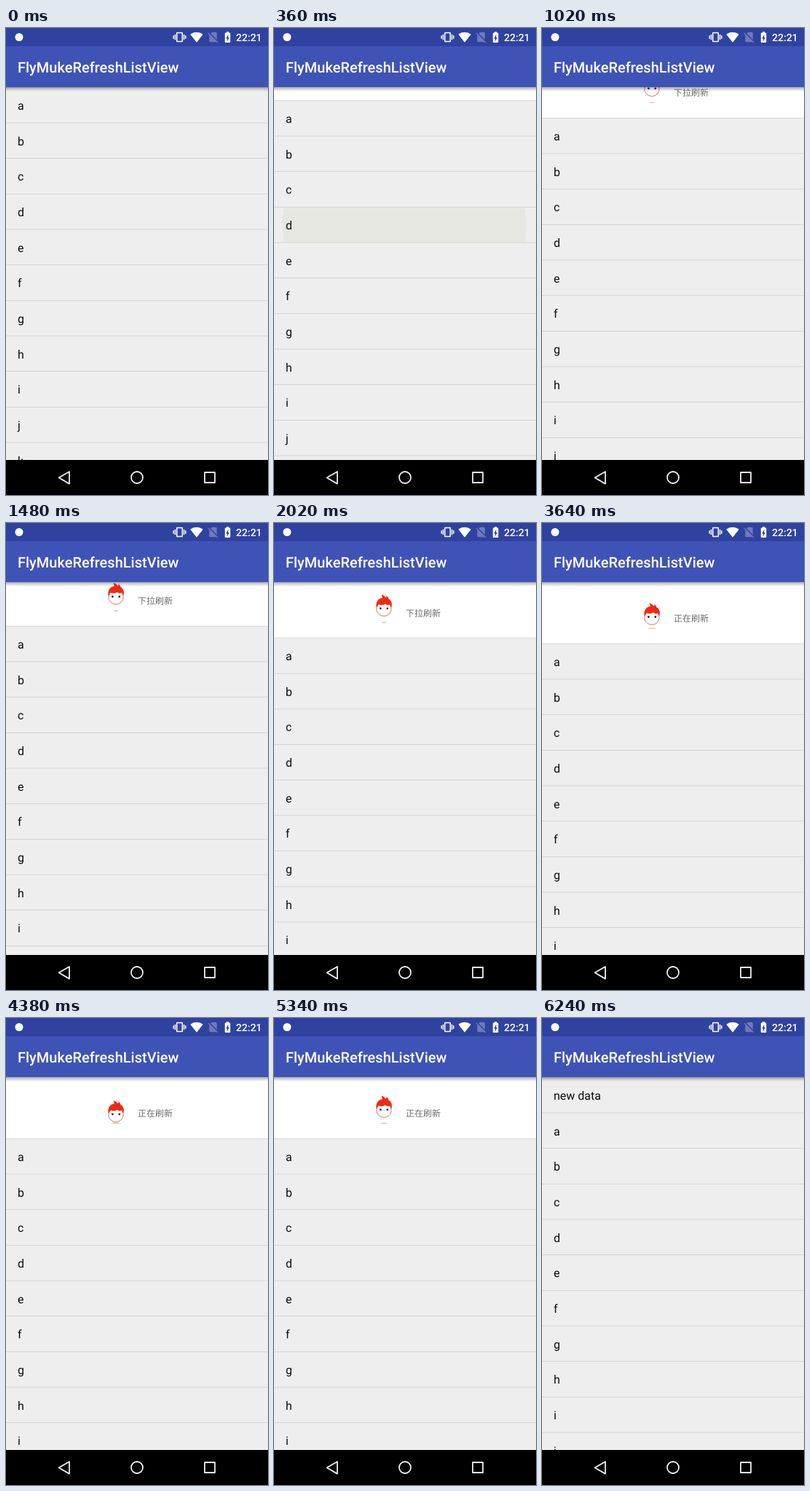
These frames come from a looping animation (360x640 px, 6260 ms). An HTML page:

```html
<!DOCTYPE html>
<html lang="en">
<head>
<meta charset="utf-8">
<title>Pull to refresh list</title>
<style>
  html, body { margin: 0; width: 100%; height: 100%; overflow: hidden; background: #fff; }
  svg { display: block; width: 360px; height: 640px; font-family: Roboto, "Noto Sans", sans-serif; text-rendering: geometricPrecision; }
  .rows text { font-size: 16px; fill: #0c0c0c; }
  .label { font: 12px "Noto Sans CJK SC", "Noto Sans CJK", sans-serif; fill: #6c6c6c; }
  .title { font-size: 20px; font-weight: 500; fill: #fff; }
  .clock { font-size: 14px; font-weight: 500; fill: #fff; }
</style>
</head>
<body>
<svg viewBox="0 0 360 640">
  <defs>
    <linearGradient id="shade" x2="0" y2="1">
      <stop offset="0" stop-color="#000" stop-opacity=".33"/>
      <stop offset=".4" stop-color="#000" stop-opacity=".18"/>
      <stop offset=".75" stop-color="#000" stop-opacity=".05"/>
      <stop offset="1" stop-color="#000" stop-opacity="0"/>
    </linearGradient>
    <clipPath id="rowClip"><rect y="146" width="360" height="48"/></clipPath>
  </defs>

  <rect width="360" height="640" fill="#fff"/>

  <g id="list">
    <rect width="360" height="600" fill="#eee"/>
    <rect y="-.67" width="360" height=".67" fill="#c8c8c8"/>
    <g clip-path="url(#rowClip)"><circle id="ripple" cx="179" cy="170" fill="#e7e7e2"/></g>
    <g id="rows" class="rows"></g>
    <text id="label" class="label" x="181" y="-30.3"></text>
    <ellipse id="shadow" cx="151" cy="-21.4" ry=".8" fill="#c9c6c4"/>
    <g id="face">
      <ellipse cx="151" cy="-40" rx="10.2" ry="9.8" fill="#fff" stroke="#dd7563" stroke-width="1"/>
      <path d="M140.6-42C139.6-49 142.5-54.5 149-55.2Q148.2-57.5 147.8-59.5Q152-58.6 153-55.6Q155-56.2 154.8-58Q157.6-56 157.2-54.2C161.5-52 162.8-47.5 161.4-42Q159.8-44 159.4-46.4Q156-44.2 153-47Q148.5-44.2 143.2-46.4Q142.6-43.5 140.6-42Z" fill="#f02a12"/>
      <circle cx="146.4" cy="-40.8" r="1.4" fill="#222"/>
      <circle cx="155.8" cy="-40.8" r="1.4" fill="#222"/>
    </g>
  </g>

  <rect y="81" width="360" height="6.5" fill="url(#shade)"/>
  <rect width="360" height="25" fill="#3042a0"/>
  <rect y="25" width="360" height="56" fill="#3f53b7"/>
  <text class="title" x="16" y="60.85">FlyMukeRefreshListView</text>

  <!-- Status icons on a 24-unit grid: vibrate, wifi, no SIM, charging -->
  <g fill="#fff">
    <circle cx="18" cy="12.5" r="5.5"/>
    <path transform="translate(229.5 3.5) scale(.75)" fill-rule="evenodd" d="M0 9h2v6H0ZM3 7h2v10H3ZM22 9h2v6h-2ZM19 7h2v10h-2ZM7.5 3h9Q18 3 18 4.5v15Q18 21 16.5 21h-9Q6 21 6 19.5v-15Q6 3 7.5 3ZM8 5v14h8V5Z"/>
    <path transform="translate(253 3.5) scale(.75)" d="M12 21.5L23.6 7Q18.5 3 12 3T.4 7Z"/>
    <path transform="translate(275.5 3.5) scale(.75)" fill="#6f7abb" d="M19 5Q19 3 17 3H10L7.7 5.3 19 16.7ZM3.7 3.9L2.4 5.2 5 7.8V19Q5 21 7 21H17L18 20.7 19.9 22.6 21.1 21.4Z"/>
    <path transform="translate(295.5 3.5) scale(.75)" fill-rule="evenodd" d="M15.7 4H14V2h-4v2H8.3Q7 4 7 5.3v15.4Q7 22 8.3 22h7.4Q17 22 17 20.7V5.3Q17 4 15.7 4ZM11 20v-5.5H9L13 7v5.5h2Z"/>
  </g>
  <text class="clock" x="316" y="18">22:21</text>

  <rect y="592" width="360" height="48" fill="#000"/>
  <g fill="none" stroke="#eee" stroke-width="1.8" stroke-linejoin="round">
    <path d="M87 608v16.6L72.6 616.3Z"/>
    <circle cx="180" cy="616" r="8"/>
    <rect x="273" y="609" width="14" height="14"/>
  </g>
</svg>
<script>
  const LOOP = 6260, TOP = 81.67, PITCH = 48.667, FULL = 84;
  const READY = 2420, RELEASE = 2800, DONE = 5820;
  const BOUNCE = 600, BOUNCE_PEAK = 2880;

  const PULL = [[40, 0], [360, 18], [1020, 42], [1480, 60], [1940, 74], [2200, 81], [READY, FULL]];
  const RIPPLE_SIZE = [[60, 15], [360, 167], [600, 240]];
  const RIPPLE_ALPHA = [[60, 0], [140, 1], [380, 1], [600, 0]];

  const $ = id => document.getElementById(id);
  const [list, rows, label, shadow, face, ripple] =
    ["list", "rows", "label", "shadow", "face", "ripple"].map($);

  const make = (name, attrs) => {
    const node = document.createElementNS("http://www.w3.org/2000/svg", name);
    for (const key in attrs) node.setAttribute(key, attrs[key]);
    return rows.appendChild(node);
  };

  // Linear interpolation over [time, value] steps, held at both ends.
  const at = (steps, t) => {
    if (t <= steps[0][0]) return steps[0][1];
    for (let i = 1; i < steps.length; i++) {
      const [t0, a] = steps[i - 1], [t1, b] = steps[i];
      if (t < t1) return a + (b - a) * (t - t0) / (t1 - t0);
    }
    return steps[steps.length - 1][1];
  };

  const letters = [..."abcdefghijkl"];
  const cells = letters.map((_, i) => {
    make("rect", { y: i * PITCH + 48, width: 360, height: .67, fill: "#c8c8c8" });
    return make("text", { x: 16, y: i * PITCH + 30.3 });
  });

  const setText = (node, text) => {
    if (node.textContent !== text) node.textContent = text;
  };

  const status = t => t < READY ? "下拉刷新" : t < RELEASE ? "放开刷新" : "正在刷新";

  function draw(t) {
    const done = t >= DONE;
    const busy = t >= RELEASE && !done;
    const offset = done ? 0 : at(PULL, t);
    list.setAttribute("transform", `translate(0 ${TOP + offset})`);

    const items = done ? ["new data", ...letters] : letters;
    cells.forEach((cell, i) => setText(cell, items[i]));
    setText(label, status(t));

    const drop = busy ? (1 - Math.cos((t - BOUNCE_PEAK) / BOUNCE * 2 * Math.PI)) / 2 : 0;
    face.setAttribute("transform", `translate(0 ${drop * 7})`);
    shadow.setAttribute("rx", (busy ? 5 : 4) + drop * 2);

    ripple.setAttribute("r", at(RIPPLE_SIZE, t));
    ripple.setAttribute("opacity", at(RIPPLE_ALPHA, t));
  }

  const start = performance.now();
  function tick() {
    draw((performance.now() - start) % LOOP);
    requestAnimationFrame(tick);
  }
  draw(0);
  requestAnimationFrame(tick);
</script>
</body>
</html>
```
